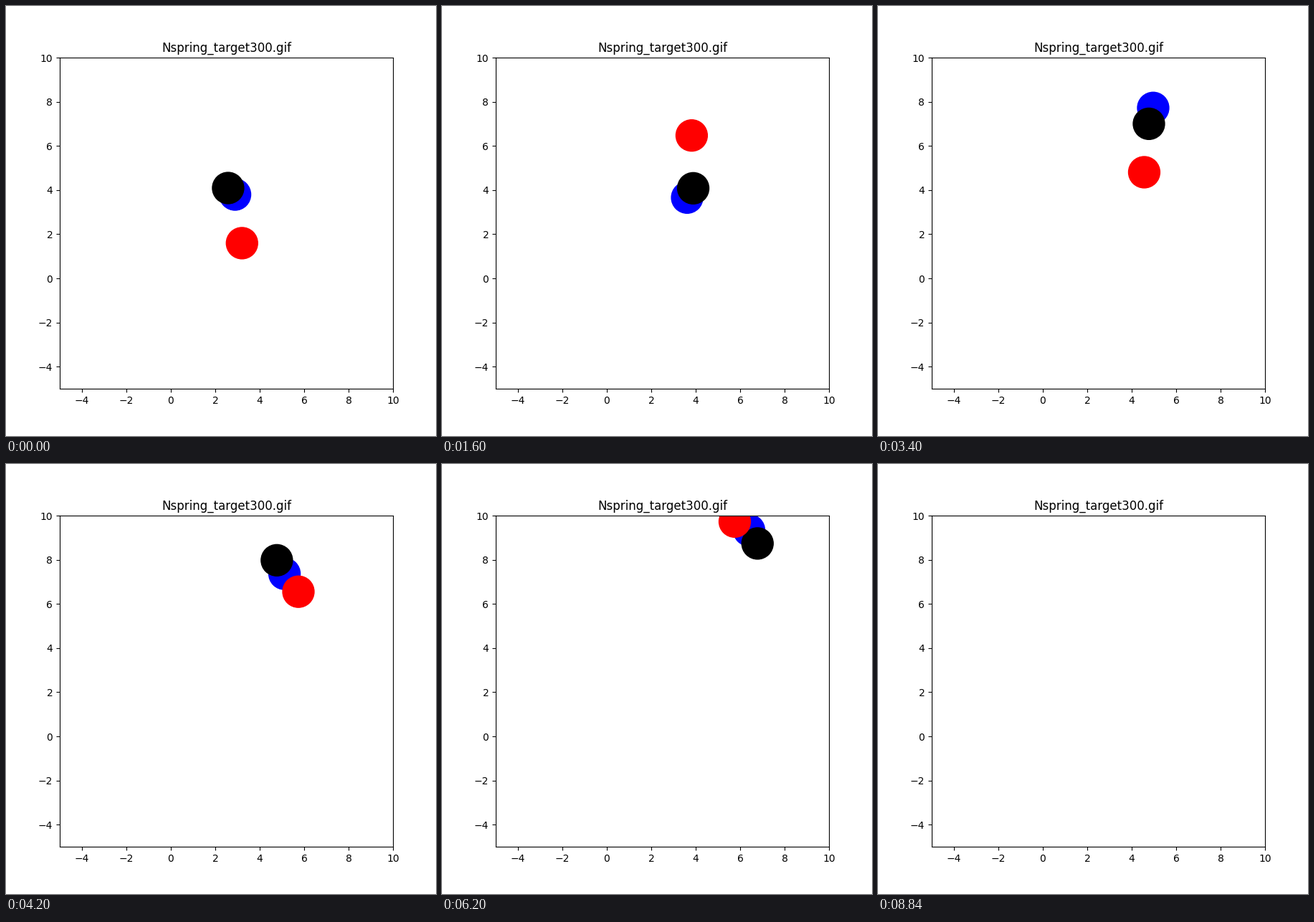
Recreate the animation shown at these times as a matplotlib script. Size 600 by 600 pixels, loop 8980 ms.

```python
import numpy as np
import matplotlib.pyplot as plt
from matplotlib.animation import FuncAnimation

LOOP, TICK, STEP, CLEAR_AT = 8980, 20, 100, 8840
PX = np.array([31, -30.8])       # pixels per data unit


def swing(step, size, degrees, peak, growth=0):
    """Harmonic sway that peaks at a given step; its size drifts linearly."""
    return (size + growth * step) * np.cos(np.radians(degrees) * (step - peak))


def positions(step):
    """Blue, black and red balls; equal masses around a steadily moving centre."""
    centre = np.array([319.6 + 1.712 * step, 282.67 - 3.034 * step])
    red = np.array([swing(step, 20.1, 9.2, 6.65),
                    swing(step, 53.5, 9.5, 35.2)])
    blue = np.array([swing(step, 9.5, 9.1, -9.9, -0.045),
                     swing(step, 35.4, 9.3, 52, 0.083)])
    pixels = centre + np.array([blue, -blue - red, red])
    return (pixels - [75, 534]) / PX - 5


fig, ax = plt.subplots(figsize=(6, 6), dpi=100)
ax.set(xlim=(-5, 10), ylim=(-5, 10), title="Nspring_target300.gif",
       xticks=range(-4, 11, 2), yticks=range(-4, 11, 2))
balls = ax.scatter(*positions(0).T, s=1000, c=["blue", "black", "red"])


def draw(i):
    ms = i * TICK
    balls.set_visible(ms < CLEAR_AT)
    balls.set_offsets(positions(ms // STEP))
    return balls,


anim = FuncAnimation(fig, draw, frames=LOOP // TICK, interval=TICK,
                     init_func=lambda: draw(0), repeat=True, repeat_delay=0)
plt.show()
```
